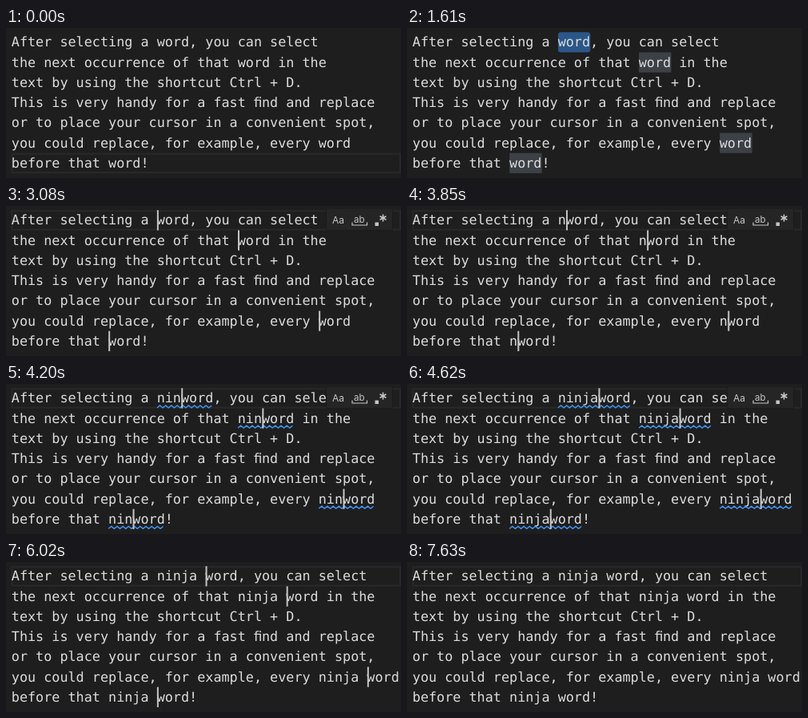
An HTML page for the animation above (7.91 s loop, 494 px wide and 188 px high).

```html
<!DOCTYPE html>
<html lang="en">
<head>
<meta charset="utf-8">
<title>Multi-cursor editing</title>
<style>
  html, body { margin: 0; width: 100%; height: 100%; overflow: hidden; background: #1e1e1e; }
  svg { display: block; }
  .code text {
    font: 16.8px "DejaVu Sans Mono", monospace;
    fill: #dcdcdc;
    white-space: pre;
    text-rendering: geometricPrecision;
  }
  .tools text { font: 12px Inter, sans-serif; fill: #c5c5c5; }
</style>
</head>
<body>
<svg id="stage" width="494" height="188" viewBox="0 0 494 188">
  <rect id="current" x="7.5" width="485.5" height="23.4" fill="none" stroke="#282828" stroke-width="2"/>
  <g id="marks"></g>
  <g id="code" class="code"></g>
  <g id="waves" fill="none" stroke="#3f96f5" stroke-width="1.4"></g>
  <g id="carets" fill="#c4c5c3"></g>
  <g id="tools" class="tools">
    <rect x="400" y="4" width="84" height="27.5" fill="#181818" opacity=".6"/>
    <rect x="401" y="4" width="82" height="26" fill="#252526"/>
    <text x="408" y="22">Aa</text>
    <text x="435" y="21" style="font-size:11.5px">ab</text>
    <path d="M433 20.500v3.500h18.500v-3.500" fill="none" stroke="#c5c5c5" stroke-width="1.200"/>
    <rect x="461.500" y="20.500" width="4.500" height="4.500" fill="#c5c5c5"/>
    <path d="M471.500 10.500v9M467.600 12.750l7.800 4.500M467.600 17.250l7.800-4.500" stroke="#c5c5c5" stroke-width="1.600"/>
  </g>
</svg>
<script>
const LOOP = 7910, LEFT = 6.8, TOP = 5.2, ROW = 25.25, CELL = 16.8 * 0.60205;
const LINES = [
  "After selecting a word, you can select",
  "the next occurrence of that word in the",
  "text by using the shortcut Ctrl + D.",
  "This is very handy for a fast \uFB01nd and replace",
  "or to place your cursor in a convenient spot,",
  "you could replace, for example, every word",
  "before that word!"
];

// Each "word" in the order it gets selected
const SPOTS = [0, 1, 5, 6].map(row => ({ row, col: LINES[row].indexOf("word") }));

// Each step changes only the listed fields.
// line: highlighted row, sel: selected words, carets: visible count, at: caret offset
const STEPS = [
  [0, { line: 6, sel: 0, carets: 0, at: 0, typed: "", wave: false, tools: false }],
  [910, { line: 0, carets: 1, at: 2 }],
  [1050, { line: -1, sel: 1, at: 4 }],
  [1610, { carets: 0 }],
  [1960, { sel: 2, carets: 2, tools: true }],
  [2310, { sel: 3, carets: 3 }],
  [2660, { sel: 4, carets: 4 }],
  [3080, { line: 0, sel: 0, at: 0 }],
  [3570, { carets: 0 }],
  [3850, { carets: 4, typed: "n" }],
  [3920, { wave: true }],
  [3990, { typed: "ni" }],
  [4130, { typed: "nin" }],
  [4340, { typed: "ninj" }],
  [4620, { typed: "ninja" }],
  [4760, { tools: false }],
  [4970, { typed: "ninja " }],
  [5460, { carets: 0 }],
  [5530, { wave: false }],
  [6020, { carets: 4 }],
  [6580, { carets: 0 }],
  [7070, { carets: 4 }],
  [7630, { carets: 0 }]
];

const $ = id => document.getElementById(id);
const colX = col => LEFT + col * CELL;
const rowY = row => TOP + row * ROW;

function add(parent, tag, attrs) {
  const el = document.createElementNS("http://www.w3.org/2000/svg", tag);
  for (const key in attrs) el.setAttribute(key, attrs[key]);
  return parent.appendChild(el);
}

const rows = LINES.map((line, i) => {
  const el = add($("code"), "text", { x: LEFT, y: rowY(i) + 18.2 });
  el.textContent = line;
  return el;
});

function wavePath(x, y, width) {
  const half = 3.6;
  let d = `M${x} ${y}`;
  for (let dx = half, up = true; dx <= width; dx += half, up = !up) {
    d += `L${x + dx} ${up ? y - 2.8 : y}`;
  }
  return d;
}

function draw(s) {
  for (const id of ["marks", "waves", "carets"]) $(id).replaceChildren();
  $("current").setAttribute("y", rowY(s.line) + 1);
  $("current").style.display = s.line < 0 ? "none" : "";
  $("tools").style.display = s.tools ? "" : "none";

  SPOTS.forEach(({ row, col }, i) => {
    const line = LINES[row], x = colX(col), y = rowY(row);
    rows[row].textContent = line.slice(0, col) + s.typed + line.slice(col);
    if (s.sel) {
      const on = i < s.sel;
      add($("marks"), "rect", {
        x, y, width: 4 * CELL, height: ROW, rx: on ? 3.5 : 0, fill: on ? "#2b5788" : "#3c4047"
      });
    }
    if (s.wave) {
      add($("waves"), "path", { d: wavePath(x, y + ROW - 0.7, (s.typed.length + 4) * CELL) });
    }
    if (i < s.carets) {
      add($("carets"), "rect", {
        x: colX(col + s.typed.length + s.at), y, width: 2, height: ROW
      });
    }
  });
}

let shown = -1;
const start = performance.now();

function tick() {
  const time = (performance.now() - start) % LOOP;
  const step = STEPS.findLastIndex(([at]) => at <= time);
  if (step !== shown) {
    shown = step;
    draw(Object.assign({}, ...STEPS.slice(0, step + 1).map(([, change]) => change)));
  }
  requestAnimationFrame(tick);
}
tick();
</script>
</body>
</html>
```
